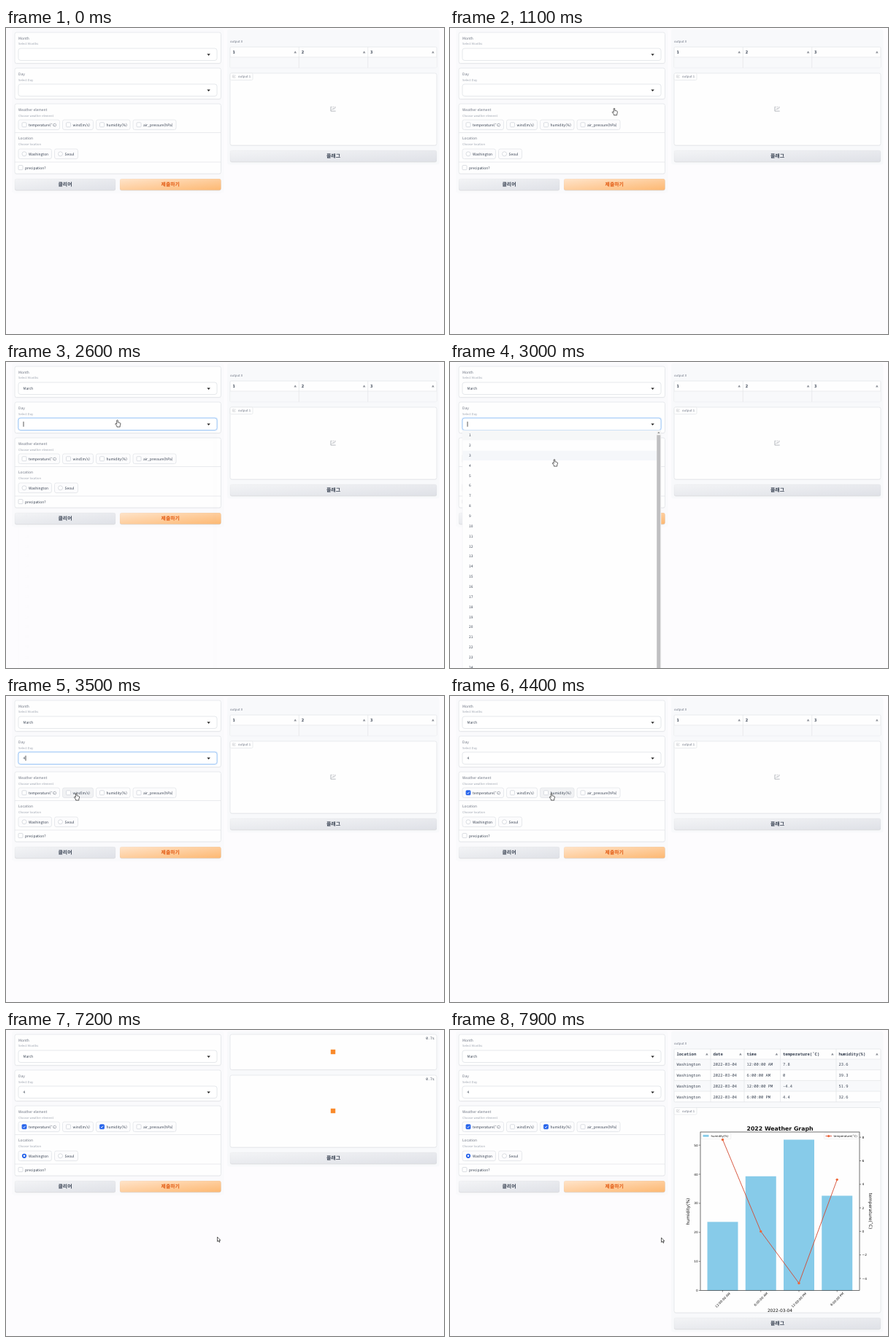
Write an HTML page that moves like this. It is 600 px wide and 420 px high and loops after 8000 ms.

```html
<!DOCTYPE html>
<html lang="ko">
<head>
<meta charset="utf-8">
<title>Weather form</title>
<style>
html, body { margin: 0; width: 100%; height: 100%; overflow: hidden; background: #fdfcfe; }
svg { display: block; width: 100%; height: 100%; }
text { font-family: "Noto Sans CJK KR", "Open Sans", sans-serif; text-rendering: geometricPrecision; white-space: pre; }
.mono { font-family: "Noto Sans Mono", monospace; }
.plot { font-family: "DejaVu Sans", sans-serif; }
</style>
</head>
<body>
<svg viewBox="0 0 600 420">
  <defs>
    <linearGradient id="gray" x2="1" y2="1"><stop stop-color="#f3f4f6"/><stop offset="1" stop-color="#dfe1e7"/></linearGradient>
    <linearGradient id="orange" x2="1" y2="1"><stop stop-color="#ffe4ca"/><stop offset="1" stop-color="#fdb872"/></linearGradient>
    <linearGradient id="hover" x2="1" y2="1"><stop stop-color="#ffe8d2"/><stop offset="1" stop-color="#fdd3a5"/></linearGradient>
  </defs>
  <g id="stage"></g>
</svg>
<script>
const LOOP = 8000, FADE = 200, ROW = 13.85;
const INK = '#374151', GRAY = '#6b7280', PALE = '#9ca3af', LINE = '#e3e5e9', BLUE = '#2563eb';
const MONTHS = 'January February March April May June July August September October November December'.split(' ');
const DAYS = Array.from({ length: 31 }, (_, i) => i + 1);
const RESULT = 7400;

// Pointer tip: time, x, y
const PATH = [
  [1100, 225, 110], [1300, 160, 36], [1450, 160, 38], [1800, 152.5, 79.5], [2600, 152.5, 79.5],
  [3000, 143, 133.5], [3300, 143, 134], [3700, 50, 133], [4100, 50, 133], [4400, 139, 133.5],
  [4900, 139, 133.5], [5200, 44, 172], [5700, 44, 172], [5900, 212.5, 206.5], [6500, 214, 212],
  [7100, 289.5, 284], [7400, 289.5, 284], [7900, 289.5, 285], [8000, 289.5, 285]
];

const clamp = v => Math.max(0, Math.min(1, v));
const fade = (t, open, close) => Math.min(clamp((t - open) / FADE), clamp((close + FADE - t) / FADE));

function pointer(t) {
  const i = PATH.findIndex(p => p[0] > t);
  if (i < 1) return null;
  const [t0, x0, y0] = PATH[i - 1], [t1, x1, y1] = PATH[i];
  const k = (t - t0) / (t1 - t0), e = k * k * (3 - 2 * k);
  return { x: x0 + (x1 - x0) * e, y: y0 + (y1 - y0) * e };
}
const over = (p, x, y, w, h) => p && p.x >= x && p.x <= x + w && p.y + 2 >= y && p.y + 2 <= y + h;

const rect = (x, y, w, h, fill, stroke = 'none', r = 0, sw = .8) =>
  `<rect x="${x}" y="${y}" width="${w}" height="${h}" rx="${r}" fill="${fill}" stroke="${stroke}" stroke-width="${sw}"/>`;
const path = (d, fill, stroke = 'none', sw = .6, attrs = '') =>
  `<path d="${d}" fill="${fill}" stroke="${stroke}" stroke-width="${sw}" ${attrs}/>`;
const dot = (x, y, r, fill, stroke = 'none') =>
  `<circle cx="${x}" cy="${y}" r="${r}" fill="${fill}" stroke="${stroke}" stroke-width=".8"/>`;
const text = (x, y, s, size = 4.92, fill = INK, attrs = '') =>
  `<text x="${x}" y="${y}" font-size="${size}" fill="${fill}" ${attrs}>${s}</text>`;
const mono = (x, y, s, size = 5.45, attrs = '') => text(x, y, s, size, INK, 'class="mono" ' + attrs);
const plot = (x, y, s, size, anchor = 'middle', attrs = '') =>
  text(x, y, s, size, '#111', `class="plot" text-anchor="${anchor}" ${attrs}`);

const card = (x, y, w, h) => rect(x, y + 1, w, h, '#00000009', 'none', 2.5) + rect(x, y, w, h, '#fefefe', LINE, 2.5);
const button = (x, y, w, s, fill, ink) =>
  rect(x, y + 1, w, 15.5, '#00000014', 'none', 2.5) + rect(x, y, w, 15.5, `url(#${fill})`, '#0000000a', 2.5) +
  text(x + w / 2, y + 10.1, s, 6.9, ink, 'font-weight="700" text-anchor="middle"');
const caption = (y, label, info) => text(17, y, label, 4.92, GRAY) + text(17, y + 7.9, info, 4.1, PALE);

function select(y, value, focused, caretAge) {
  let s = focused ? rect(16.4, y - .6, 273.2, 17.7, 'none', '#dbeafe', 3.5, 1.2) : '';
  s += rect(17, y, 272, 16.5, '#fff', focused ? '#93c0f3' : '#dfe2e6', 3);
  s += text(23.5, y + 9.8, value, 4.8) + path(`M275.4 ${y + 7.6}h4.4l-2.2 2.3z`, '#222');
  if (focused && caretAge % 1000 < 500) {
    const x = value === 'March' ? 38 : value ? 27 : 24;
    s += path(`M${x} ${y + 4.8}v7`, 'none', '#111', .7);
  }
  return s;
}

function menu(y, items, opacity, p) {
  if (!opacity) return '';
  const long = items.length > 12, h = long ? 420 - y + 10 : items.length * ROW + 1;
  let s = rect(17, y + 1.5, 272, h, '#00000010', 'none', 2) + rect(17, y, 272, h, '#fefefe', '#eceef1', 2, .5);
  items.forEach((item, i) => {
    const top = y + .3 + i * ROW;
    if (top > 420) return;
    const hot = over(p, 17, top, 272, ROW);
    if (hot || i === 0) s += rect(17.3, top, 271.4, ROW - .5, hot ? '#f5f7fa' : '#f6f7f8');
    s += text(26, top + 8.1, item, 4.8);
  });
  if (long) s += rect(283, y, 5.7, h, '#f3f3f3') + rect(283.3, y + 6.5, 5, h, '#bfbfc1') + path(`M284.2 ${y + 4}h3.4l-1.7 -1.9z`, '#777');
  return `<g opacity="${opacity}">${s}</g>`;
}

const checkbox = (x, y, on) => on
  ? rect(x, y, 6, 6, BLUE, BLUE, 1) + path(`M${x + 1.4} ${y + 3.1}l1.2 1.2l2.1 -2.5`, 'none', '#fff', .9)
  : rect(x, y, 6, 6, '#fff', '#d1d5db', 1);
const radio = (x, y, on) => on ? dot(x, y, 3.1, BLUE) + dot(x, y, 1.3, '#fff') : dot(x, y, 3, '#fff', '#d1d5db');

function chip(x, y, w, label, p, mark) {
  const hot = over(p, x, y, w, 13.5);
  return rect(x, y + .7, w, 13.5, '#00000008', 'none', 2.5) +
    rect(x, y, w, 13.5, hot ? '#f1f2f4' : '#fcfcfd', LINE, 2.5) + mark + text(x + 14, y + 8.6, label);
}

function form(t, p) {
  const monthFocus = t >= 1300 && t < 2600, dayFocus = t >= 2600 && t < 4100;
  const choices = [
    [17, 56.5, 'temperature(˚C)', t >= 4100], [77.5, 42, 'wind(m/s)', false],
    [123.5, 46.5, 'humidity(%)', t >= 4900], [174, 59, 'air_pressure(hPa)', false]
  ];
  const places = [[17, 45.5, 'Washington', t >= 5200], [66.5, 32, 'Seoul', false]];
  const monthMenu = fade(t, 1300, 1850), dayMenu = fade(t, 2600, 3300);
  const live = monthMenu || dayMenu ? null : p;

  return rect(8, 2, 290.5, 224.5, '#fafafc', 'none', 3) +
    card(12, 6, 282.5, 42.5) + caption(15.5, 'Month', 'Select Months') +
    select(28, t >= 1850 ? 'March' : '', monthFocus, t - (t < 1850 ? 1300 : 1850)) +
    card(12, 55, 282.5, 42.5) + caption(64.6, 'Day', 'Select Day') +
    select(77, t >= 3300 ? '4' : '', dayFocus, t - (t < 3300 ? 2600 : 3300)) +
    card(12, 104, 282.5, 96) + path('M12 143.6H294.5M12 184H294.5', 'none', LINE, .8) +
    caption(113.6, 'Weather element', 'Choose weather element') +
    choices.map(([x, w, s, on]) => chip(x, 126, w, s, live, checkbox(x + 5, 129.8, on))).join('') +
    caption(153, 'Location', 'Choose location') +
    places.map(([x, w, s, on]) => chip(x, 166, w, s, live, radio(x + 8, 172.8, on))).join('') +
    checkbox(17, 188.6, false) + text(26, 193.6, 'precipation?') +
    button(12, 207, 138, '클리어', 'gray', INK) +
    button(156, 207, 138.5, '제출하기', over(live, 156, 207, 138.5, 15.5) ? 'hover' : 'orange', '#e25a12') +
    menu(46.5, MONTHS, monthMenu, p) + menu(93.8, DAYS, dayMenu, p);
}

// Column edges, header names, rows of cells
function table(edges, heads, rows) {
  const bottom = 40 + rows.length * 14.7;
  let s = rect(307, 26, 283, bottom - 26, '#fefefe', LINE, 1.5);
  rows.forEach((cells, r) => {
    const y = 40 + r * 14.7;
    if (r % 2 === 0) s += rect(307.3, y, 282.4, 14.6, '#f8f9fb');
    s += path(`M307 ${y}H590`, 'none', LINE, .7);
    cells.forEach((c, i) => s += mono(edges[i] + 3.4, y + 9.4, c));
  });
  heads.forEach((h, i) => {
    s += mono(edges[i] + 3.4, 34.9, h, 5.6, 'font-weight="600"');
    s += path(`M${edges[i + 1] - 6.9} 34.6h3.6l-1.8 -3z`, '#8b8f97');
    if (i) s += path(`M${edges[i]} 26V${bottom}`, 'none', LINE, .7);
  });
  return s;
}

const plotIcon = (x, y, k) =>
  `<g transform="translate(${x} ${y}) scale(${k})">` + path('M.5 0V7H8M2 5L4 3L5.2 4L7.5 1.2', 'none', '#8d929b', .7) +
  path('M1.5 .6h1M4 .6h1M6.5 .6h1', 'none', '#8d929b', .8) + '</g>';
const tag = y => rect(307, y, 31, 9.5, '#fefefe', LINE, 1.5, .7) + plotIcon(310.5, y + 2.5, .5) + text(318, y + 6.3, 'output 1', 4.25, GRAY);

function chart() {
  const humidity = [23.6, 39.3, 51.9, 32.6], temp = [7.8, 0, -4.4, 4.4];
  const times = ['12:00:00 AM', '6:00:00 AM', '12:00:00 PM', '6:00:00 PM'];
  const cx = i => 373.5 + i * 52.25, hy = v => 357.5 - v * 3.988, ty = v => 276.4 - v * 16.15;
  const red = '#d4492f', mark = '#ee683a', legend = '#ffffffcc';
  let s = plot(452, 137.8, '2022 Weather Graph', 7.8, 'middle', 'font-weight="700"');
  humidity.forEach((v, i) => {
    s += rect(cx(i) - 21, hy(v), 42, 357.5 - hy(v), '#87cbe9');
    s += path(`M${cx(i)} 357.5v2`, 'none', '#111', .5);
    const w = times[i].length === 11 ? 0 : -1.2;
    s += plot(0, 1.6, times[i], 4.3, 'middle', `transform="translate(${cx(i)} ${370.6 + w}) rotate(-45)"`);
  });
  for (let v = 0; v <= 50; v += 10) s += path(`M343 ${hy(v)}h-2`, 'none', '#111', .5) + plot(339.8, hy(v) + 1.6, v, 4.3, 'end');
  for (let v = -4; v <= 8; v += 2) s += path(`M561 ${ty(v)}h2`, 'none', '#111', .5) + plot(564.6, ty(v) + 1.6, String(v).replace('-', '−'), 4.3, 'start');
  s += rect(344.3, 141.5, 40.5, 8, legend, '#ddd', .8, .4) + rect(346.5, 143.8, 8, 2.9, '#87cbe9') + plot(357.6, 146.9, 'humidity(%)', 3.9, 'start');
  s += path('M' + temp.map((v, i) => `${cx(i)} ${ty(v)}`).join('L'), 'none', red, .9);
  temp.forEach((v, i) => s += dot(cx(i), ty(v), 1.7, mark));
  s += rect(512.5, 141.5, 47, 8, legend, '#ddd', .8, .4) + path('M514.5 145.6h8.5', 'none', red, .9) + dot(518.7, 145.6, 1.6, mark);
  s += plot(525.5, 147.1, 'temperature(˚C)', 3.9, 'start');
  s += rect(343, 140, 218, 217.5, 'none', '#111', 0, .6);
  s += plot(0, 0, 'humidity(%)', 6, 'middle', 'transform="translate(328.2 249) rotate(-90)"');
  s += plot(0, 0, 'temperature(˚C)', 6, 'middle', 'transform="translate(574.4 248.5) rotate(90)"');
  return s + plot(452, 387, '2022-03-04', 5.9);
}

function output(t) {
  const done = t >= RESULT, flagY = done ? 395 : 168;
  let s = rect(303, 2, 290.5, flagY + 17.5, '#f8f9fb', 'none', 3);
  if (t >= 6500 && !done) {
    const clock = ((t - 6500) / 1000).toFixed(1) + 's';
    [[6, 48.5, 30], [62, 99, 111]].forEach(([y, h, mid]) => {
      s += card(307, y, 283, h) + rect(444.8, mid - 3.2, 6.4, 6.4, '#f98a2b');
      s += mono(586.8, y + 6.5, clock, 4.8, 'text-anchor="end"');
    });
  } else {
    s += text(307, 20.3, 'output 0', 4.25, GRAY);
    if (done) {
      const row = (time, temp, hum) => ['Washington', '2022-03-04', time, temp, hum];
      s += table([307, 357, 403, 452.5, 529, 590], ['location', 'date', 'time', 'temperature(˚C)', 'humidity(%)'], [
        row('12:00:00 AM', '7.8', '23.6'), row('6:00:00 AM', '0', '39.3'),
        row('12:00:00 PM', '-4.4', '51.9'), row('6:00:00 PM', '4.4', '32.6')
      ]) + card(307, 106.5, 283, 281.5) + tag(106.5) + chart();
    } else {
      s += table([307, 401.3, 495.7, 590], [1, 2, 3], [[]]) + card(307, 62, 283, 99) + tag(62) + plotIcon(444.5, 107.8, .9);
    }
  }
  return s + button(307, flagY, 283, '플래그', 'gray', INK);
}

function cursor(p) {
  if (!p) return '';
  const arrow = 'M0 0V6.4L1.5 5L2.5 7.3L3.5 6.9L2.5 4.7H4.4Z';
  const hand = 'M-.8 .6Q0 -.4 .8 .6V3.3L3.6 4Q4.6 4.3 4.4 5.5L3.7 8.2V9.6H-.6V8.4L-2.7 5.7Q-2.7 4.6 -1.6 5L-.8 5.8Z';
  return path(p.y > 221 ? arrow : hand, '#fff', '#222', .7, `stroke-linejoin="round" transform="translate(${p.x} ${p.y})"`);
}

const stage = document.getElementById('stage');
let last = '';
function frame() {
  const t = performance.now() % LOOP, p = pointer(t);
  const picture = output(t) + form(t, p) + cursor(p);
  if (picture !== last) stage.innerHTML = last = picture;
  requestAnimationFrame(frame);
}
frame();
</script>
</body>
</html>
```
